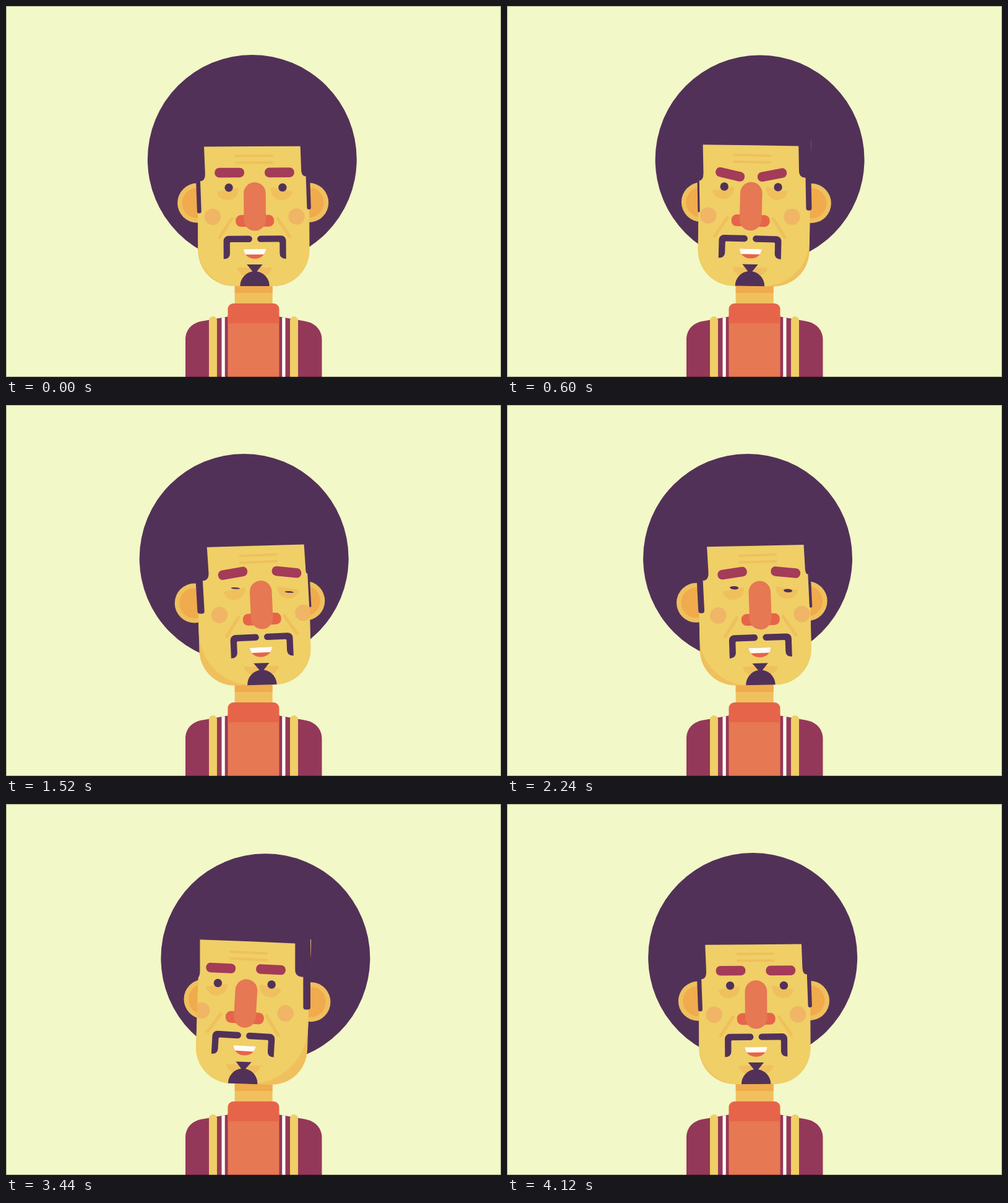
An HTML page that plays this animation: 800x600 px, repeating every 4160 ms.

```html
<!DOCTYPE html>
<html lang="en">
<head>
<meta charset="utf-8">
<title>Portrait</title>
<style>
  html, body { margin: 0; width: 100%; height: 100%; overflow: hidden; background: #f2f8c7; }
  svg { display: block; width: 100vw; height: 100vh; }
  .hair { fill: #523159; }
  .skin { fill: #efcf66; }
  .shade { fill: #efc05d; }
  .ear { fill: #f0ab4d; }
  .brow { fill: #a43b58; }
  .coat { fill: #943859; }
  .coral { fill: #e67853; }
  .red { fill: #e6654a; }
  .white { fill: #fffcf3; }
  .crease { fill: none; stroke: #efc05d; stroke-linecap: round; }
</style>
</head>
<body>
<svg viewBox="0 0 800 600">
  <defs>
    <path id="jaw" d="M310 216H490V395A58 58 0 0 1 432 453H368A58 58 0 0 1 310 395Z"/>
    <clipPath id="faceClip"><use id="clipJaw" href="#jaw"/></clipPath>
    <clipPath id="lips"><path d="M-18.3 -7.3H18.3C17 2 10 8.3 0 8.3S-17 2 -18.3 -7.3Z"/></clipPath>
    <path id="whisker" d="M-50.5 19V-10.5a8 8 0 0 1 8-8H-9.3a5.2 5.2 0 0 1 0 10.4H-38.5q-1.7 0-1.7 1.7V10q0 9-10.3 9Z"/>
    <path id="bag" d="M-17.5 0H17.5A17.5 17 0 0 1-17.5 0Z"/>
    <g id="strap">
      <rect class="skin" x="328" y="502" width="13" height="110" rx="6.5"/>
      <path class="white" d="M348.5 504.3L353.8 503.2V600H348.5Z"/>
    </g>
  </defs>
  <rect width="800" height="600" fill="#f2f8c7"/>
  <circle id="afro" class="hair" r="169"/>

  <rect class="shade" x="369.7" y="440" width="61" height="50"/>
  <rect class="ear" x="369.7" y="440" width="61" height="24"/>
  <path class="coat" d="M290 600V540C290 523 301 512 318 509.5L358 502.5H442L482 509.5C499 512 510.500 523 510.500 540V600Z"/>
  <use href="#strap"/>
  <use href="#strap" transform="matrix(-1 0 0 1 800 0)"/>
  <rect class="coral" x="358.500" y="500" width="83" height="100"/>
  <path class="red" d="M358.500 513V490a9 9 0 0 1 9-9H432.500a9 9 0 0 1 9 9V513Z"/>

  <g id="earL"><circle class="shade" r="32"/><circle class="ear" r="24.500"/></g>
  <g id="earR"><circle class="shade" r="32"/><circle class="ear" r="24.500"/></g>

  <g id="head">
    <use class="shade" href="#jaw"/>
    <path id="light" class="skin"/>
  </g>
  <g clip-path="url(#faceClip)">
    <path id="wrinkles" class="crease" stroke-width="4" d="M-29 -5.200H29M-29 5.600H29"/>
    <g id="bags" class="shade">
      <use href="#bag" transform="translate(-43.700) rotate(-11)"/>
      <use href="#bag" transform="translate(43.700) rotate(11)"/>
    </g>
    <g id="cheeks" fill="#f0b565"><circle cx="-67.700" r="13.200"/><circle cx="67.700" r="13.200"/></g>
    <path id="lines" class="crease" stroke-width="5" d="M-37 -15L-57 15M37 -15L57 15"/>
    <g id="chin">
      <path class="shade" d="M-28 -30H28C27 -20 17 -14 0 -14S-27 -20 -28 -30Z"/>
      <path class="hair" d="M-12.700 -35H12.700L3.500 -23.700A23.700 24 0 0 1 23.700 0V8H-23.700V0A23.700 24 0 0 1-3.500 -23.700Z"/>
    </g>
  </g>
  <path id="fringe" class="hair"/>
  <ellipse id="eyeL" class="hair"/>
  <ellipse id="eyeR" class="hair"/>
  <rect id="browL" class="brow" x="-23.900" y="-7.800" width="47.800" height="15.600" rx="7.300"/>
  <rect id="browR" class="brow" x="-23.900" y="-7.800" width="47.800" height="15.600" rx="7.300"/>
  <g id="nose">
    <rect class="red" x="-31" y="13.600" width="62" height="19" rx="8.500"/>
    <rect class="coral" x="-17.800" y="-39.200" width="35.600" height="78.400" rx="17.800"/>
  </g>
  <g id="mouth" clip-path="url(#lips)">
    <rect class="red" x="-20" y="-10" width="40" height="20"/>
    <rect class="white" x="-20" y="-10" width="40" height="11.300"/>
  </g>
  <g id="moustache" class="hair">
    <use href="#whisker"/><use href="#whisker" transform="scale(-1 1)"/>
  </g>
  <rect x=".5" y=".5" width="799" height="599" fill="none" stroke="#000" stroke-opacity=".3"/>
</svg>
<script>
const STEP = 40, LOOP = 4160;
const $ = id => document.getElementById(id);
const clamp = v => Math.min(1, Math.max(0, v));
const mix = (a, b, k) => a + (b - a) * k;
const easeIn = p => k => k ** p;
const easeOut = p => k => 1 - (1 - k) ** p;
const smooth = k => k * k * (3 - 2 * k);
const quad = (u, [c, k, q]) => c + k * u + q * u * u;

// Head turn: start step, end step, from, to, easing
const turns = [
  [0, 14, -2.2, 8.8, easeOut(3)],
  [14, 42, 8.8, -21.6, easeIn(1.5)],
  [42, 54, -21.6, -21.6, smooth],
  [54, 72, -21.6, 20.2, easeOut(2.5)],
  [72, 85, 20.2, 20.2, smooth],
  [85, 103, 20.2, -2.8, easeIn(1.15)],
  [103, 104, -2.8, -2.2, smooth]
];

// Parallax of each part: x, y and rotation as the head turns
const parts = {
  afro: [[400, 1, 0], [248, .03, .002], 0],
  earL: [[310, .41, .004], [318.3, -.14, 0], 0],
  earR: [[490, .3, -.009], [318.2, .1, 0], 0],
  wrinkles: [[400, -.46, .003], [247.500, -.07, -.002], .16],
  bags: [[400, -.82, 0], [296.800, -.08, -.003], .1],
  cheeks: [[400, -.83, 0], [340.700, 0, -.012], .1],
  lines: [[400, -.85, 0], [359, 0, -.008], .15],
  nose: [[400.4, -.75, .0035], [324.4, 0, -.005], .17],
  moustache: [[400.2, -.87, 0], [390, 0, -.006], .17],
  mouth: [[400.3, -.78, 0], [400.500, 0, -.006], .17],
  chin: [[400.1, -.9, 0], [453, 0, -.003], .12]
};

const move = (id, x, y, r = 0) =>
  $(id).setAttribute('transform', `translate(${x} ${y}) rotate(${r})`);

const pulse = (f, a, b, c, d) =>
  smooth(clamp((f - a) / (b - a))) * (1 - smooth(clamp((f - c) / (d - c))));

function jawLight(u) {
  const l = 58 + 1.9 * Math.max(0, -u), r = 58 + 1.9 * Math.max(0, u);
  return `M310 216H490V${453 - r}A${r} ${r} 0 0 1 ${490 - r} 453H${310 + l}A${l} ${l} 0 0 1 310 ${453 - l}Z`;
}

// One sideburn, from the hairline corner down and back up its outer edge
function sideburn(u, s, corner, lean, lobe, inner, outer, end) {
  const t = (1.6 - .08 * u) / 2;
  const width = Math.max(0, s * (outer - inner));
  const x = outer - s * width, r = Math.min(4, width / 2);
  const down = [`L${corner}`, `L${lean} ${lobe - 12}`, `Q${lean} ${lobe} ${x - t} ${lobe}`];
  if (width > .3) down.push(
    `L${x + t} ${end - r}Q${x + t} ${end} ${x + t + s * r} ${end}`,
    `H${outer + t - s * r}Q${outer + t} ${end} ${outer + t} ${end - r}`);
  down.push(`L${outer - t} ${lobe}`, `L${outer - t} 200`);
  return down.join('');
}

function fringe(u) {
  const xl = quad(u, [319.3, -.33, .0015]), yl = quad(u, [227, -.28, -.006]);
  const xr = quad(u, [474.7, -.42, .002]), yr = quad(u, [226.7, .02, -.004]);
  const left = sideburn(u, -1, `${xl} ${yl}`, xl + 1.6 - .08 * u,
    283 - .08 * u, 314.1 - .34 * u, 308, 335 - .17 * u);
  const right = sideburn(u, 1, `${xr} ${yr}`, xr + 1.3 - .07 * u,
    276 + .2 * u, 485 - .24 * u, 492, 329.4 + .16 * u);
  return `M400 200L400 ${(yl + yr) / 2}${left}ZM400 200L400 ${(yl + yr) / 2}${right}Z`;
}

function brows(u, angry, sad) {
  const x = 400.1 - .645 * u;
  const y = quad(u, [269.3, -.05, -.005]) + 4.4 * angry + 2.3 * sad;
  const gap = 40.4 - 6.7 * angry + 3.1 * sad, tilt = 12.3 * angry - 8 * sad;
  const dy = gap * u * .0016;
  move('browL', x - gap, y - dy, .14 * u + tilt);
  move('browR', x + gap, y + dy, .14 * u - tilt);
}

function eyes(u, shut) {
  const x = 401.700 - .82 * u, y = quad(u, [293.4, -.08, -.003]), dy = 43.500 * u * .0015;
  for (const [id, s, drop] of [['eyeL', -1, 1.4], ['eyeR', 1, 9.5]]) {
    move(id, x + s * 43.400, y + s * dy + drop * shut, 4 * shut);
    $(id).setAttribute('rx', mix(6.700, 7.2, shut));
    $(id).setAttribute('ry', mix(6.700, 1.3, shut));
  }
}

function draw(ms) {
  const f = Math.floor((ms % LOOP) / STEP);
  const [a, b, from, to, ease] = turns.find(t => f < t[1]);
  const u = mix(from, to, ease((f - a) / (b - a)));
  for (const id in parts) {
    const [px, py, r] = parts[id];
    move(id, quad(u, px), quad(u, py), r * u);
  }
  const spin = `rotate(${.1 * u} 400 307)`;
  $('head').setAttribute('transform', spin);
  $('clipJaw').setAttribute('transform', spin);
  $('light').setAttribute('d', jawLight(u));
  $('fringe').setAttribute('d', fringe(u));
  brows(u, pulse(f, 0, 7, 14, 23), pulse(f, 28, 38, 54, 63));
  eyes(u, pulse(f, 32, 38, 54, 60));
}

const start = performance.now();
function tick() {
  draw(performance.now() - start);
  requestAnimationFrame(tick);
}
tick();
</script>
</body>
</html>
```
